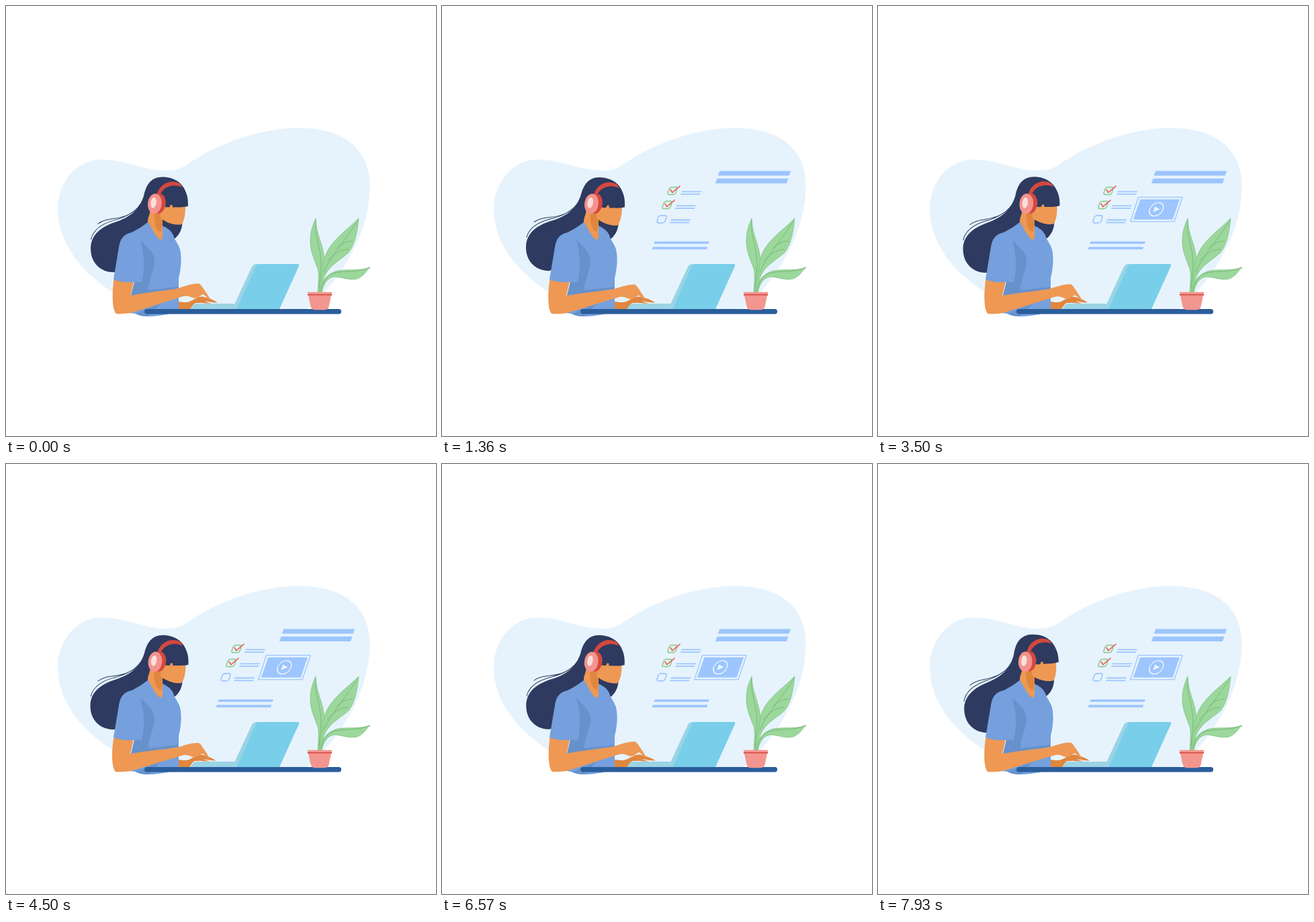
These frames come from a looping animation (640x640 px, 8 s). An HTML page:

```html
<!DOCTYPE html>
<html lang="en">
<head>
<meta charset="utf-8">
<title>Online learning</title>
<style>
  html, body { margin: 0; width: 100%; height: 100%; overflow: hidden; background: #fff; }
  svg { display: block; width: 100%; height: 100%; }
  .line { fill: none; stroke-linecap: round; stroke-linejoin: round; }
  .navy { fill: #2e3a5f; }
  .skin { fill: #ee9853; }
  .tan { fill: #e0863f; }
  .ui { fill: #9dc5fe; }
  .leaf { fill: #9cd79b; stroke: #78bb7d; stroke-width: .6; }
  .vein { stroke: #72b879; stroke-width: .9; }
</style>
</head>
<body>
<svg viewBox="0 0 640 640">
  <path fill="#e6f3fd" d="M77 302C77 262 106 228.500 142 228.500C180 229 205 245 238 245C262 245 268 236 285 226C330 199 385 181.500 437 181.500C500 182 541.500 210 541.500 268C541 330 510 385 475 425C460 442 450 451 440 455H215C150 430 77 375 77 302Z"/>

  <g id="ui"></g>

  <g id="video" opacity="0">
    <path class="line" stroke="#9dc5fe" stroke-width="1.3" d="M387.5 284.7H453.3L441 320.8H375.7Z"/>
    <path class="ui" d="M390.5 287.7H449L438.6 317.7H379.8Z"/>
    <g transform="translate(414.3 302.6) skewX(-18)" fill="#eef6ff">
      <circle class="line" r="10" stroke="#eef6ff" stroke-width="1.4"/>
      <path d="M-3.5 -4.2L5 0L-3.5 4.2Z"/>
    </g>
  </g>

  <g id="plant">
    <path class="leaf" d="M461 316C461 340 474 357 474 381C472 399 469 410 468 426H464C465 410 466 399 464 391C458 375 452 363 453 347C453 335 457 325 461 316Z"/>
    <path class="leaf" d="M525 316C505 336 477 353 473 381C472 398 467 410 466 426H469C470 413 473 402 479 394C487 383 499 377 510 367C519 356 523 337 525 316Z"/>
    <path class="leaf" d="M542 389C526 395 509 391 494 394C477 398 469 411 467 426H470C473 412 480 403 490 403C501 404 512 409 523 406C533 402 536 394 542 389Z"/>
    <path class="line vein" d="M461 318C458 342 470 361 469 386L466 420M524 318C509 345 485 368 473 396M478 381C487 369 497 363 509 362M493 360C499 354 506 350 515 350M541 389C524 398 502 393 487 398C476 402 471 412 469 425"/>
  </g>

  <g class="head">
    <path class="navy" d="M232 254.500C216 255 209 266 205.500 281C200 302 186 313 166 320.500C142 328 126 340 126 361C126 384 143 397 162 396L195 380L240 348L250 347C260 340 264 328 262 314L269 290C271 270 255 254 232 254.500Z"/>
    <path class="line" stroke="#2e3a5f" d="M137 324C150 314 166 319 183 310C195 304 201 296 205 286M126.500 347C130 332 143 324 160 319C180 314 195 305 204 291"/>
  </g>

  <path class="skin" d="M161 400H188V416H160Z"/>
  <path fill="#75a0dd" d="M212 321C203 328 195 333 187 337C174 340 170 347 168 359L160 407C169 411 180 412 191 411L186 431L178 456L193 458C205 464 224 462 240 459L257 452V405C262 385 261 371 259 362C256 353 250 347 249 341C245 333 239 330 233 327L231 346Z"/>
  <path fill="#6791cb" d="M200 348C211 360 222 367 221 382C220 395 212 408 212 423L257 418V421L186 432L191 411H202C207 390 206 370 200 348ZM193 458L230 443L212 462C204 462 198 461 193 458Z"/>
  <path class="skin" d="M215 303C214 311 211 315 211 321C216 329 222 342 228 347C231 349 233 347 233 344V318L240 300Z"/>
  <path class="tan" d="M220 306C221 319 221 333 230 336C232 335 232 329 233 318L232 306Z"/>

  <g class="head">
    <path class="skin" d="M230 296H267C267.500 310 265 321 261 325.300C250 327 238 322 230 316Z"/>
    <path class="navy" d="M228 284C233 270 244 265 256 266C269 272 271.500 284 271 298C263 300 255 299.500 248 299.500L246.500 288C245 293 245 298 243 299.500C239 300 236 299 233 297Z"/>
    <path fill="#d4483f" d="M223.5 285C226 268 239 261 249 261.5C256 262 261 265 262 270C251 264 232 268 229 284Z"/>
    <ellipse cx="228" cy="294" rx="9.7" ry="14.8" fill="#d4483f" transform="rotate(6 228 294)"/>
    <ellipse cx="221.5" cy="294.3" rx="10.3" ry="15" fill="#f3938d" transform="rotate(6 221.5 294)"/>
    <ellipse cx="219.6" cy="292.8" rx="4.2" ry="8" fill="#fadfda" transform="rotate(9 219.6 293)"/>
  </g>

  <g fill="#9ad4e5">
    <path d="M340 444L366 388Q368 384 373 384H380L352 451H274L279 445Q281 443 284 443H340Z"/>
    <path fill="#79cee9" d="M343.5 451L372 387Q373.500 384 377 384H434Q437 384 436 387L407 451Z"/>
  </g>

  <path id="rearHand" class="tan" d="M257 440C264 441 270 442 275 439C281 436 287 432 292 432.500C301 434 308 437 314.500 441.500C306 442 300 439 295 439.500L305 442.500C297 443 291 441 287 442H282C278 444 276 448 274 451H257Z"/>
  <path id="frontArm" class="skin" d="M160.500 407.500C169 411 180 412 190 411L185.500 431C210 426 235 424 257 420C268 416 278 413 287 413C291 415 294 421 299 428L305 438C300 435 297 431 293 429C289 431 286 435 281 435C276 434 271 430 264 432C238 440 211 449 185 457C177 458 170 458.500 164 458C158 452 157.500 429 160.500 407.500Z"/>
  <path class="line" stroke="#2a5d9b" stroke-width="7.5" d="M209.800 454.800H495.300"/>

  <path fill="#f3968f" d="M449 425.800H485V431H484L480.500 447.500Q479 452.300 474 452.300H460Q455 452.300 453.500 447.500L450 431H449Z"/>
  <path class="line" stroke="#d1463e" stroke-width="1.5" d="M449.500 429.800H484.500"/>
</svg>
<script>
const LOOP = 8000;
const clamp = v => Math.min(1, Math.max(0, v));
const smooth = v => (1 - Math.cos(Math.PI * clamp(v))) / 2;
const byId = id => document.getElementById(id);
const heads = document.querySelectorAll('.head');
const ui = byId('ui');
const bars = [], fades = [];

function add(tag, attrs) {
  const node = document.createElementNS('http://www.w3.org/2000/svg', tag);
  for (const key in attrs) node.setAttribute(key, attrs[key]);
  return ui.appendChild(node);
}

// Slanted bar that grows from its left end.
function bar(x, y, width, height, start) {
  const node = add('path', { class: 'ui' });
  bars.push({ node, x, y, width, height, start });
}

function drawBar({ node, x, y, width, height, start }, t) {
  const w = width * smooth((t - start) / 400), slant = height * 0.37;
  node.setAttribute('d', w ? `M${x} ${y}h${w}l${-slant} ${height}h${-w}z` : '');
}

function row(x, y, start, checked) {
  const box = add('rect', {
    class: 'line', x: -6, y: -5.5, width: 12, height: 11, rx: 3,
    stroke: checked ? '#8fd08f' : '#9dc5fe', 'stroke-width': 1.7,
    transform: `translate(${x} ${y}) skewX(-18)`
  });
  fades.push({ node: box, start, length: 250 });
  bar(x + 14, y + 0.2, 29, 1.8, start + 50);
  bar(x + 12.6, y + 4, 29, 1.8, start + 100);
  if (!checked) return;
  const tick = add('path', {
    class: 'line', stroke: '#e9625c', 'stroke-width': 1.7,
    d: `M${x - 3} ${y - 2}l2.800 4.500l11.200 -9.500`
  });
  fades.push({ node: tick, start: start + 250, length: 200 });
}

bar(413.3, 245.4, 106, 7.2, 70);
bar(409.5, 256.8, 106, 7.2, 250);
row(343, 275.2, 450, true);
row(335, 296.2, 600, true);
row(327, 317.4, 750, false);
bar(316.7, 350.4, 81.3, 3.6, 850);
bar(314, 358.6, 81.3, 3.6, 930);
fades.push({ node: byId('video'), start: 1430, length: 520 });

// Head tilt in degrees at its turning points.
const tilt = [[-800, -1], [1300, 1.75], [3400, -1], [5700, 2.9], [8500, -4.5]];
function headAngle(t) {
  const i = tilt.findIndex(([time]) => time > t);
  const [t0, a0] = tilt[i - 1], [t1, a1] = tilt[i];
  return a0 + (a1 - a0) * smooth((t - t0) / (t1 - t0));
}

function render(t) {
  const angle = headAngle(t);
  heads.forEach(head => head.setAttribute('transform', `rotate(${angle} 220 328)`));
  bars.forEach(item => drawBar(item, t));
  fades.forEach(({ node, start, length }) =>
    node.setAttribute('opacity', smooth((t - start) / length)));

  const reach = 0.3 + 3 * Math.cos(2 * Math.PI * (t - 1250) / 5400);
  byId('rearHand').setAttribute('transform',
    `translate(257 0) scale(${1 + reach / 57.5} 1) translate(-257 0)`);
  const lift = Math.cos(2 * Math.PI * t / 820);
  byId('frontArm').setAttribute('transform',
    `translate(${0.4 * lift - 0.4} 0) rotate(${0.45 - 0.45 * lift} 165 440)`);
}

function frame(now) {
  render(now % LOOP);
  requestAnimationFrame(frame);
}
render(0);
requestAnimationFrame(frame);
</script>
</body>
</html>
```
